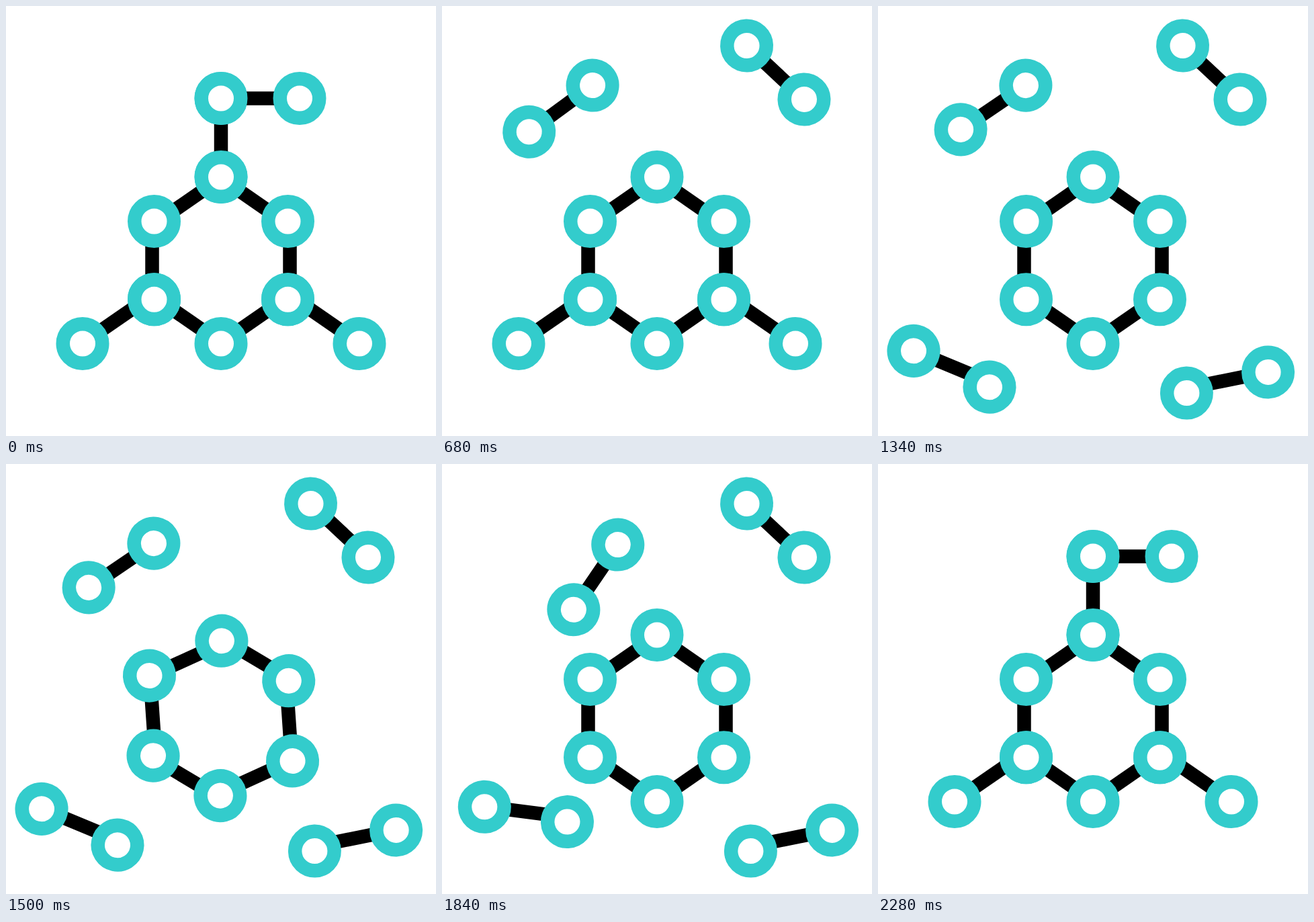
These frames come from a looping animation (640 px wide and 640 px high, 2.7 s). An HTML page:

```html
<!DOCTYPE html>
<html lang="en">
<head>
<meta charset="utf-8">
<title>Molecule</title>
<style>
  html, body { margin: 0; width: 100%; height: 100%; overflow: hidden; background: #fff; }
  svg { display: block; width: 100%; height: 100%; }
  path { fill: none; stroke: #000; stroke-width: 20.5; }
  circle { fill: #fff; stroke: #3cc; stroke-width: 20.5; }
</style>
</head>
<body>
<svg id="stage" viewBox="0 0 640 640"></svg>
<script>
const LOOP = 2700;
const stage = document.getElementById('stage');

function add(parent, tag, attrs = {}) {
  const node = document.createElementNS('http://www.w3.org/2000/svg', tag);
  for (const key in attrs) node.setAttribute(key, attrs[key]);
  return parent.appendChild(node);
}

function molecule(atoms, bond) {
  const group = add(stage, 'g');
  add(group, 'path', { d: bond });
  for (const [cx, cy] of atoms) add(group, 'circle', { cx, cy, r: 29.25 });
  return group;
}

const ring = molecule(
  [[320, 254.5], [419.5, 320.5], [419.5, 436.75], [320, 502.5], [220.5, 436.75], [220.5, 320.5]],
  'M320 256L422.5 327V430.5L320 501.5L217.5 430.5V327Z'
);
const RING_SPIN = [1339, 1756];

// Each pair leaves during "out" for the centre "to", turned by "turn", and returns during "back".
const pairs = [
  { atoms: [[114, 502.5], [220.5, 436.75]], bond: 'M114 502L217.5 430.5',
    to: [109.5, 540.25], turn: 57.2, out: [696, 1032], back: [1714, 2089] },
  { atoms: [[419.5, 436.75], [526, 502.5]], bond: 'M422.5 430.5L526 502',
    to: [520, 560.5], turn: -46.1, out: [998, 1333], back: [1942, 2276] },
  { atoms: [[320, 137.5], [320, 254.5]], bond: 'M320 137.5V254.5',
    to: [171.5, 151], turn: 55.8, out: [311, 729], back: [1700, 2033] },
  { atoms: [[320, 137.5], [437, 137.5]], bond: 'M320 137.5H437',
    to: [496.25, 99], turn: 43.1, out: [0, 340], back: [1924, 2260] }
];

for (const pair of pairs) {
  const [[x1, y1], [x2, y2]] = pair.atoms;
  pair.from = [(x1 + x2) / 2, (y1 + y2) / 2];
  pair.group = molecule(pair.atoms, pair.bond);
}

function ease(time, [start, end]) {
  const u = Math.min(1, Math.max(0, (time - start) / (end - start)));
  return u * u * (3 - 2 * u);
}

function draw(now) {
  const time = now % LOOP;
  ring.setAttribute('transform', `rotate(${360 * ease(time, RING_SPIN)} 320 378.5)`);
  for (const { group, from, to, turn, out, back } of pairs) {
    const p = ease(time, out) - ease(time, back);
    const dx = (to[0] - from[0]) * p;
    const dy = (to[1] - from[1]) * p;
    group.setAttribute('transform', `translate(${dx} ${dy}) rotate(${turn * p} ${from})`);
  }
}

const begin = performance.now();
function tick() {
  draw(performance.now() - begin);
  requestAnimationFrame(tick);
}
tick();
</script>
</body>
</html>
```
